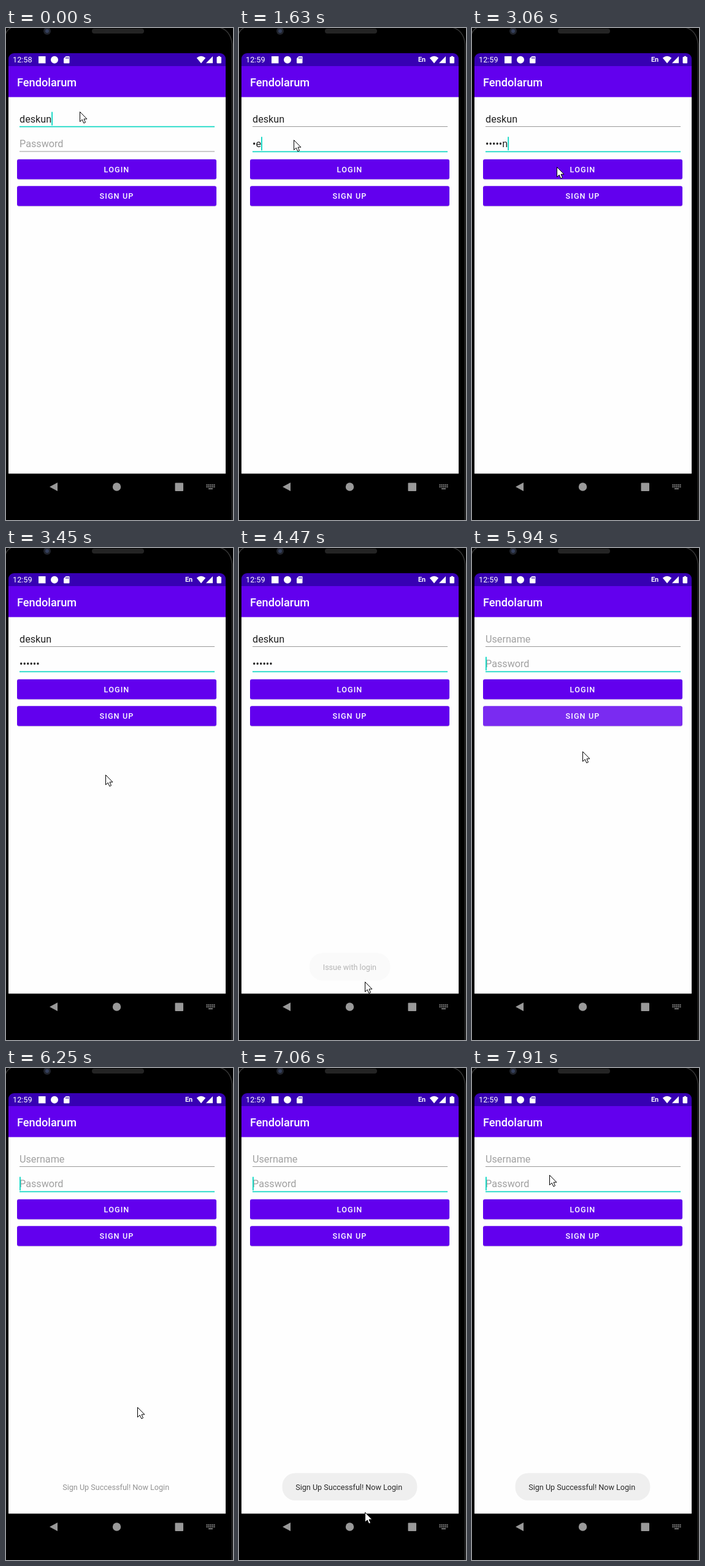
An HTML page with a canvas for the animation above (8 s loop, 370 by 801 pixels).

```html
<!DOCTYPE html>
<html lang="en">
<head>
<meta charset="utf-8">
<title>Login screen</title>
<style>
  html, body { margin: 0; width: 100%; height: 100%; overflow: hidden; background: #000; }
  canvas { display: block; }
</style>
</head>
<body>
<canvas id="stage" width="370" height="801"></canvas>
<script>
const ctx = document.getElementById('stage').getContext('2d');
const LOOP = 8000;
const PURPLE = '#6200ee', TEAL = '#14d8c4', PAPER = '#fefefe', INK = '#212121', HINT = '#a0a0a0';
const USER = 'deskun';
const FOCUS_AT = 950, CLEAR_AT = 5935;
const KEY_TIMES = [1480, 1600, 1740, 1870, 2010, 2550];

// Screen refreshes: start, end, count
const BURSTS = [
  [410, 1360, 8], [1480, 2020, 5], [2550, 3570, 9], [3690, 4590, 8], [4740, 4740, 1],
  [5020, 5940, 8], [6100, 7060, 8], [7210, 7480, 3], [7760, 7910, 2]
];

// Pointer path: time, x, y
const PATH = [
  [280, 120, 136], [1000, 89, 182], [2550, 89, 182], [3000, 138, 226], [3188, 138, 226],
  [3442, 162, 368], [3570, 180, 671], [3750, 205, 706], [4460, 205, 706], [4730, 205, 664],
  [4900, 205, 664], [5410, 173, 286], [5820, 173, 286], [6100, 190, 390], [6237, 214, 552],
  [6500, 205, 723], [7100, 205, 723], [7480, 153, 616], [7910, 126, 174]
];

const ramp = (t, from, to) => Math.min(1, Math.max(0, (t - from) / (to - from)));

function snap(t) {
  const burst = BURSTS.findLast(b => t >= b[0]);
  if (!burst) return 0;
  const [start, end, count] = burst;
  if (count === 1) return start;
  const step = (end - start) / (count - 1);
  return start + Math.min(count - 1, Math.floor((t - start) / step + 0.15)) * step;
}

function pointerAt(t) {
  const i = PATH.findIndex(p => p[0] > t);
  if (i === 0) return PATH[0].slice(1);
  if (i < 0) return PATH.at(-1).slice(1);
  const [a, b] = [PATH[i - 1], PATH[i]];
  const k = ramp(t, a[0], b[0]);
  return [a[1] + (b[1] - a[1]) * k, a[2] + (b[2] - a[2]) * k];
}

function rect(x, y, w, h, color, radius = 0) {
  ctx.fillStyle = color;
  ctx.beginPath();
  ctx.roundRect(x, y, w, h, radius);
  ctx.fill();
}

function circle(x, y, r, color) {
  ctx.fillStyle = color;
  ctx.beginPath();
  ctx.arc(x, y, r, 0, 7);
  ctx.fill();
}

function shape(d, color) {
  ctx.fillStyle = color;
  ctx.fill(new Path2D(d));
}

function text(str, x, y, size, color, weight = 400, spacing = 0) {
  ctx.font = `${weight} ${size}px Roboto, sans-serif`;
  ctx.letterSpacing = spacing + 'px';
  ctx.fillStyle = color;
  ctx.fillText(str, x, y);
  return ctx.measureText(str).width;
}

function drawPhone() {
  rect(0, 0, 370, 801, '#000');
  ctx.strokeStyle = '#343434';
  ctx.lineWidth = 1.5;
  ctx.stroke(new Path2D('M348 -1Q366 4 368.5 26V801M-1 11Q1 3 9 -1'));
  rect(140, 1, 85, 8, '#242424', 4);
  circle(67, 5, 6, '#20232b');
  circle(67, 5, 3, '#35405c');

  shape('M71 747L84 740V754Z', '#999');
  circle(180.5, 747, 6.7, '#999');
  rect(275.5, 740.5, 13.5, 13.5, '#999', 1);
  for (let i = 0; i < 10; i++) {
    rect(326.5 + (i % 5) * 3, 743 + Math.floor(i / 5) * 3, 2, 2, '#888');
  }
  rect(330, 749.3, 7, 1.7, '#888');
}

function drawBars(t) {
  rect(4, 41, 354, 22, '#3700b3', [9, 9, 0, 0]);
  rect(4, 62, 354, 50.5, PURPLE);
  text(t < FOCUS_AT ? '12:58' : '12:59', 11, 56, 12.7, '#fff');
  rect(53, 46, 11.5, 11.5, '#fff');
  circle(79, 51.7, 6, '#fff');
  shape('M97.5 46H102.5Q103.5 46 103.5 47V56.5Q103.5 57.5 102.5 57.5H95Q94 57.5 94 56.5V49.5Z', '#fff');
  for (let i = 0; i < 3; i++) rect(97.3 + i * 1.9, 47.5, 1, 2.5, '#3700b3');
  if (t >= FOCUS_AT) text('En', 292, 55, 10.8, '#fff', 700);
  shape('M318 57.5L310.8 48.7Q318 43 325.2 48.7Z', '#fff');
  shape('M326 57.3L337 46V57.3Z', '#fff');
  rect(343.5, 47, 7.5, 10.5, '#fff', 1);
  rect(345.6, 45.8, 3.3, 2, '#fff');
  text('Fendolarum', 18, 95, 18.2, '#fff', 500);
}

function drawField(value, hint, y, focused, caret) {
  const width = text(value || hint, 22, y, 16.2, value ? INK : HINT);
  if (focused) rect(22, y + 6.2, 318, 1.8, TEAL);
  else rect(22, y + 6.4, 318, 1, '#999');
  if (focused && caret) rect(22 + (value ? width : 0), y - 17, 1.9, 22, TEAL);
}

function drawButton(label, x, y, pressed) {
  rect(18, y + 1, 325, 32.5, '#d9d5e0', 3);
  rect(18, y, 325, 32.5, pressed ? '#7a2bf1' : PURPLE, 3);
  text(label, x, y + 21.2, 12.6, '#fff', 500, 1.12);
}

function drawToast(label, x, width, textAlpha, boxAlpha) {
  ctx.globalAlpha = boxAlpha;
  rect(x, 659.5, width, 44.5, '#efefef', 21);
  ctx.globalAlpha = textAlpha;
  text(label, x + 21.7, 686.7, 12.6, '#2a2a2a');
  ctx.globalAlpha = 1;
}

function drawPointer(x, y) {
  ctx.save();
  ctx.translate(Math.round(x) + 0.5, Math.round(y) + 0.5);
  const arrow = new Path2D('M0 0V16L3.7 12.6L6.3 18.4L9 17.2L6.5 11.6H11.4Z');
  ctx.fillStyle = '#fff';
  ctx.fill(arrow);
  ctx.strokeStyle = '#000';
  ctx.lineWidth = 1;
  ctx.stroke(arrow);
  ctx.restore();
}

function passwordAt(t) {
  const typed = KEY_TIMES.filter(k => t >= k).length;
  if (!typed || t >= CLEAR_AT) return '';
  return '•'.repeat(typed - 1) + (t < 3300 ? USER[typed - 1] : '•');
}

function draw(now) {
  const t = snap(now);
  const focusPassword = t >= FOCUS_AT;
  const blink = t % 1000;
  const caret = t < 3400 || blink < 400 || blink >= 900;

  drawPhone();
  rect(4, 62, 354, 663.5, PAPER);
  drawBars(t);
  drawField(t < CLEAR_AT ? USER : '', 'Username', 153.6, !focusPassword, caret);
  drawField(passwordAt(t), 'Password', 194.2, focusPassword, caret);
  drawButton('LOGIN', 159.6, 213.8, t > 3180 && t < 3440);
  drawButton('SIGN UP', 152.5, 257.2, t > 5800 && t < 6100);

  const issue = ramp(t, 4330, 4730) * (1 - ramp(t, 5460, 5880));
  drawToast('Issue with login', 115, 131.3, issue, issue);
  drawToast('Sign Up Successful! Now Login', 70.5, 219.8, ramp(t, 6100, 6374), ramp(t, 6240, 6640));
  drawPointer(...pointerAt(t));
}

function tick() {
  draw(performance.now() % LOOP);
  requestAnimationFrame(tick);
}
tick();
</script>
</body>
</html>
```
